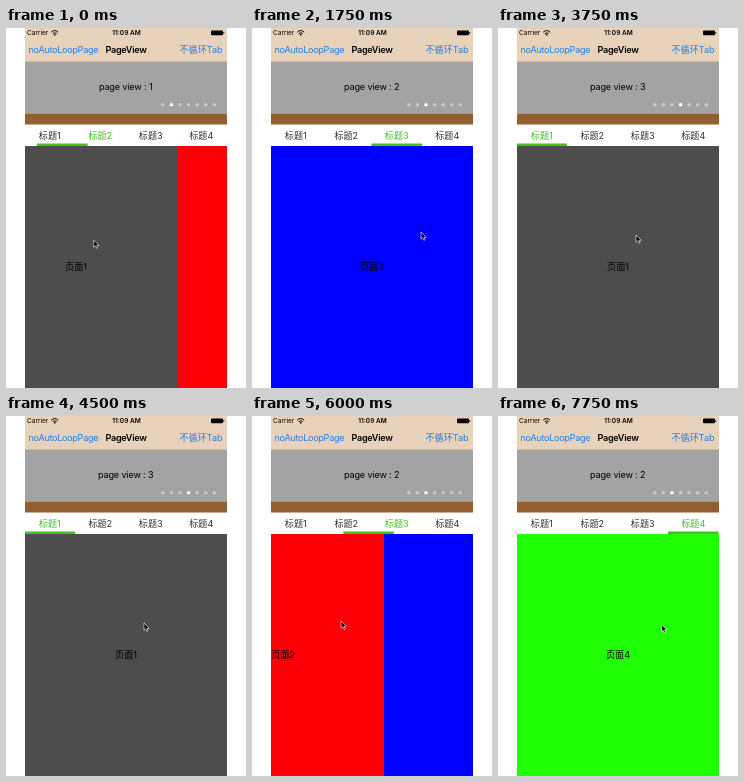
Recreate the animation shown at these times as an HTML page. Size 240x360 px, loop 8000 ms.

```html
<!DOCTYPE html>
<html lang="zh">
<head>
<meta charset="utf-8">
<title>PageView</title>
<style>
html, body { margin: 0; width: 100%; height: 100%; overflow: hidden; background: #fff; }
svg { display: block; width: 240px; height: 360px; }
text { font: 9.1px Inter, "Noto Sans CJK SC", "Noto Sans CJK JP", sans-serif; }
.mid { text-anchor: middle; }
.status { font-size: 6.5px; }
.link { fill: #2480e4; }
.bold { font-weight: 600; }
.tight { letter-spacing: -.3px; }
</style>
</head>
<body>
<svg viewBox="0 0 240 360">
  <clipPath id="screen"><rect x="19" width="202" height="360"/></clipPath>
  <g clip-path="url(#screen)">
    <rect x="19" width="202" height="34" fill="#e8d2bb"/>
    <rect x="19" y="33.5" width="202" height=".5" fill="#b9a592"/>
    <text class="status" x="21" y="7.2">Carrier</text>
    <path d="M45.2 4.2Q48.7 .9 52.2 4.2M46.7 5.7Q48.7 3.9 50.7 5.7" fill="none" stroke="#000"/>
    <circle cx="48.7" cy="6.9" r=".8"/>
    <text class="status bold mid" x="120.5" y="7.2">11:09 AM</text>
    <rect x="205" y="2.5" width="12" height="4.8" rx="1"/>
    <rect x="217.4" y="4" width=".8" height="1.8"/>
    <text class="link tight" x="22.5" y="25">noAutoLoopPage</text>
    <text class="bold tight mid" x="120" y="25">PageView</text>
    <text class="link" x="216.7" y="25" text-anchor="end">不循环Tab</text>

    <rect x="19" y="34" width="202" height="51.5" fill="#a3a3a3"/>
    <text id="banner" class="mid" x="119.7" y="62" letter-spacing="-.15"></text>
    <g id="dots"></g>
    <rect x="19" y="96" width="202" height="22" fill="#fff"/>
    <rect x="19" y="85.5" width="202" height="11" fill="#945f30"/>

    <g id="tabs"></g>
    <rect id="bar" y="115.5" width="50.5" height="2.5" fill="#3fc41c"/>
    <g id="pages"></g>
  </g>
  <path id="cursor" d="M0 0V7.2L1.7 5.7L2.9 8.3L4.1 7.8L3 5.3H5.2Z" stroke="#fff" stroke-width=".6"/>
</svg>
<script>
const LEFT = 19, WIDTH = 202, TAB = WIDTH / 4;
const STEP = 250, CYCLE = 5000, LOOP = 8000;
const SWIPE = 750, MAX_DRAG = 150, BANNER = 2750;
const colors = ['#4d4d4d', '#fb0007', '#00f', '#21ff06'];

// Each swipe turns one page, starting where the pointer grabs it
const swipes = [
  { at: -100, x: 138, y: 207 },
  { at: 810, x: 178.5, y: 196 },
  { at: 1925, x: 169, y: 204 },
  { at: 2950, x: 163.5, y: 208.5 }
];

const $ = id => document.getElementById(id);
function add(parent, tag, attrs, label = '') {
  const el = document.createElementNS('http://www.w3.org/2000/svg', tag);
  for (const key in attrs) el.setAttribute(key, attrs[key]);
  el.textContent = label;
  return parent.appendChild(el);
}

const dots = Array.from({ length: 7 }, (_, i) =>
  add($('dots'), 'circle', { cx: 156.8 + 8.58 * i, cy: 76.7, r: 1.8 }));
const tabs = colors.map((_, i) =>
  add($('tabs'), 'text', { class: 'mid', x: LEFT + TAB * (i + .5) - .5, y: 110.5 }, '标题' + (i + 1)));
const pages = colors.map((fill, i) => {
  const page = add($('pages'), 'g', {});
  add(page, 'rect', { y: 118, width: WIDTH, height: 242, fill });
  add(page, 'text', { class: 'mid', x: WIDTH / 2, y: 241.7 }, '页面' + (i + 1));
  return page;
});

const easeOut = u => 1 - (1 - Math.min(1, Math.max(0, u))) ** 2;

function pose(time) {
  const turns = swipes.map(s => easeOut((time - s.at) / SWIPE));
  const done = turns.filter(turn => turn === 1).length;
  const next = done % swipes.length;
  const drag = done < swipes.length ? Math.min(MAX_DRAG, turns[next] * WIDTH) : 0;
  return {
    pos: turns.reduce((a, b) => a + b) % 4,
    x: swipes[next].x - drag,
    y: swipes[next].y + drag / 10,
    banner: 2 + Math.floor((time - 500) / BANNER)
  };
}

function draw({ pos, x, y, banner }) {
  const active = Math.ceil(pos) % 4;
  const barPos = Math.min(pos, 3 * (4 - pos));
  pages.forEach((page, i) => {
    const offset = (i - pos + 5) % 4 - 1;
    page.setAttribute('transform', `translate(${LEFT + Math.ceil(WIDTH * offset)} 0)`);
  });
  tabs.forEach((tab, i) => tab.setAttribute('fill', i === active ? '#3fc41c' : '#333'));
  dots.forEach((dot, i) => dot.setAttribute('fill', i === banner ? '#fff' : '#c9c9c9'));
  $('bar').setAttribute('x', LEFT + TAB * barPos - .5);
  $('banner').textContent = 'page view : ' + banner;
  $('cursor').setAttribute('transform', `translate(${x} ${y})`);
}

const start = performance.now();
function tick() {
  const time = (performance.now() - start) % LOOP % CYCLE;
  draw(pose(Math.floor(time / STEP) * STEP));
  requestAnimationFrame(tick);
}
tick();
</script>
</body>
</html>
```
